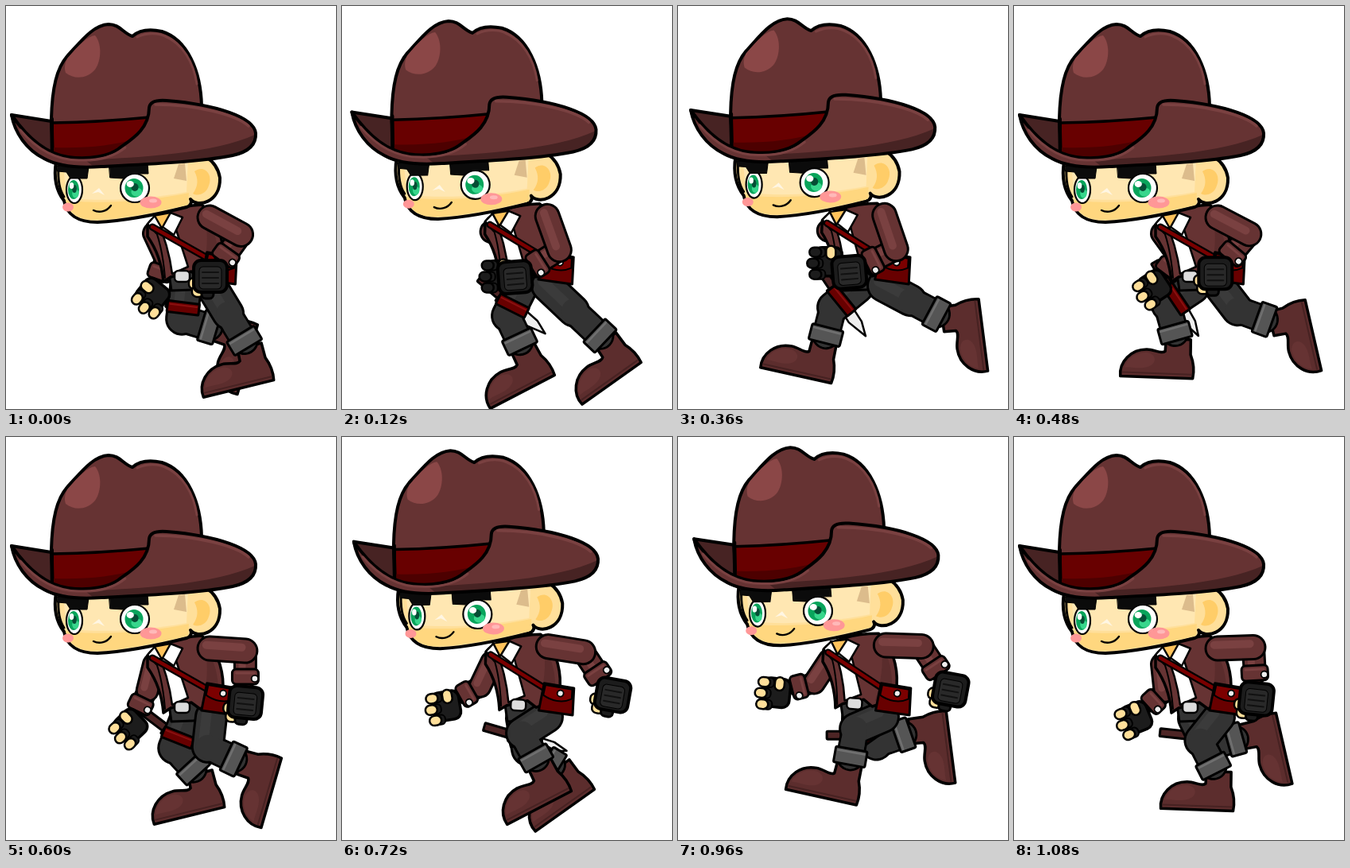
Write an HTML page with a canvas that moves like this. It is 415 by 507 pixels and loops after 1.2 s.

```html
<!DOCTYPE html>
<html lang="en">
<head>
<meta charset="utf-8">
<title>Running adventurer</title>
<style>
html, body { margin: 0; width: 100%; height: 100%; overflow: hidden; background: #fff; }
canvas { display: block; }
</style>
</head>
<body>
<canvas id="stage" width="415" height="507"></canvas>
<script>
const ctx = document.getElementById('stage').getContext('2d');
const STEP = 120, COUNT = 10, RAD = Math.PI / 180;
const BROWN = '#663333', LIGHT = '#7a4141', RED = '#680000', PANTS = '#333', GLOVE = '#1c1c1c', SKIN = '#ffdf9a';

// One run cycle as a mean plus first and second harmonics.
function wave(step, mean, c1, s1, c2 = 0, s2 = 0) {
  const a = step * 36 * RAD;
  return mean + c1 * Math.cos(a) + s1 * Math.sin(a) + c2 * Math.cos(2 * a) + s2 * Math.sin(2 * a);
}

const bootAngle = s => wave(s, -41, 30, -48, -4, 10);
const nearFoot = s => ({ x: wave(s, 288, 4, 66, 15), y: wave(s, 414, 11, -8, 8, 4), angle: bootAngle(s) });
const farFoot = s => ({ x: wave(s, 248, 12, -56, 9, 2), y: wave(s, 412, -10, 27, 6, 14), angle: bootAngle(s + 5) });
const nearReach = s => ({ x: wave(s, 279, -22, -74), y: wave(s, 332, 3, 10, 6) });
const farReach = s => ({ x: wave(s, 162, 14, 39, 8), y: wave(s, 338, 0, 0, 26, -8) });

// The head rises once per stride, higher on the second one.
function headShift(s) {
  const rise = (s < 5 ? 11 : 16) * Math.sin(Math.PI * (s % 5 / 4) ** 1.3);
  return [rise, -rise * .75];
}

// Two-bone limb; a reach beyond full length stretches both bones.
function joint(from, to, upper, lower, side) {
  const dx = to.x - from.x, dy = to.y - from.y, d = Math.hypot(dx, dy);
  const k = Math.max(1, d / (upper + lower));
  const u = upper * k, l = lower * k;
  const along = (d * d + u * u - l * l) / (2 * d);
  const out = side * Math.sqrt(Math.max(0, u * u - along * along));
  return { x: from.x + (dx * along + dy * out) / d, y: from.y + (dy * along - dx * out) / d };
}

const direction = (a, b) => Math.atan2(b.y - a.y, b.x - a.x);
const mix = (a, b, t) => ({ x: a.x + (b.x - a.x) * t, y: a.y + (b.y - a.y) * t });
const before = (p, angle, gap) => ({ x: p.x - gap * Math.cos(angle), y: p.y - gap * Math.sin(angle) });

function shape(d, fill, width = 0, color = '#000') {
  const p = new Path2D(d);
  if (fill) { ctx.fillStyle = fill; ctx.fill(p); }
  if (width) { ctx.lineWidth = width; ctx.strokeStyle = color; ctx.stroke(p); }
}

function paint(fill, width) {
  ctx.fillStyle = fill;
  ctx.fill();
  if (width) { ctx.lineWidth = width; ctx.strokeStyle = '#000'; ctx.stroke(); }
}

function oval(x, y, rx, ry, fill, width = 0) {
  ctx.beginPath();
  ctx.ellipse(x, y, rx, ry, 0, 0, 7);
  paint(fill, width);
}

function box(x, y, w, h, r, fill, width = 3) {
  ctx.beginPath();
  ctx.roundRect(x, y, w, h, r);
  paint(fill, width);
}

function placed({ x, y }, angle, draw) {
  ctx.save();
  ctx.translate(x, y);
  ctx.rotate(angle);
  draw();
  ctx.restore();
}

function segment(a, b, w, fill, shine) {
  const d = `M${a.x} ${a.y}L${b.x} ${b.y}`;
  shape(d, null, w, '#000');
  shape(d, null, w - 6, fill);
  placed({ x: -w * .13, y: -w * .13 }, 0, () => shape(d, null, w * .3, shine));
}

function boot(foot) {
  placed(foot, foot.angle * RAD, () => {
    shape('M-15-5L16-5 16 14C20 24 21 34 19 44L-72 42C-74 24-59 8-39 8C-29 8-21 14-16 10Z', '#5c2d2d', 3.5);
    shape('M-67 31C-64 18-50 11-38 12C-26 15-26 26-38 30C-48 33-58 30-67 31Z', BROWN);
    shape('M-69 37L17 39', null, 2, '#472222');
  });
}

function leg(hip, foot, knee) {
  const angle = direction(knee, foot), cuff = before(foot, angle, 14);
  boot(foot);
  segment(knee, cuff, 36, PANTS, '#3b3b3b');
  segment(hip, knee, 42, PANTS, '#3b3b3b');
  shape(`M${knee.x} ${knee.y}L${cuff.x} ${cuff.y}`, null, 30, PANTS);
  placed(cuff, angle, () => {
    box(-10, -20, 20, 40, 2, '#555');
    shape('M-6-17L-6 17', null, 2.5, '#707070');
  });
}

function sleeve(shoulder, elbow, hand, w) {
  const angle = direction(elbow, hand), cuff = before(hand, angle, w);
  segment(elbow, cuff, w - 3, BROWN, LIGHT);
  segment(shoulder, elbow, w, BROWN, LIGHT);
  placed(cuff, angle, () => {
    box(-10, -w / 2, 19, w, 5, BROWN);
    shape(`M-5 ${5 - w / 2}L-5 ${w / 2 - 5}`, null, 3, LIGHT);
    oval(2, -w * .36, 4.2, 4.2, '#eee', 1.8);
  });
}

function nearHand(hand, fist) {
  placed(hand, (hand.x - 255) * .12 * RAD, () => {
    if (!fist) {
      box(-27, 1, 15, 14, 6, SKIN, 2.5);
      box(-23, 11, 15, 14, 6, SKIN, 2.5);
      box(-11, 14, 15, 13, 5, GLOVE);
    }
    box(-21, -21, 42, 40, 9, GLOVE, 4);
    box(-14, -13, 28, 28, 5, '#292929', 1);
    for (let y = -6; y < 12; y += 7) shape(`M-10 ${y}H10`, null, 2, '#111');
  });
}

function farHand(hand, angle, fist) {
  placed(hand, angle, () => {
    box(-16, -18, 34, 36, 9, GLOVE, 3.5);
    for (const i of [-1, 0, 1]) {
      const x = -19 + Math.abs(i) * 3, y = 2 + i * 14;
      box(x - 2, y - 6, 15, 12, 5, GLOVE, 2);
      box(x - 7, y - 6, 15, 12, 6, fist ? GLOVE : SKIN, 2.5);
    }
    box(-2, -20, 12, 17, 6, SKIN, 2.5);
  });
}

function knife(holster, thighAngle) {
  placed(holster, (thighAngle - 90 * RAD) * .65 + 23 * RAD, () => {
    shape('M-12-7L36-6 54 0 28 8-12 7Z', '#eee', 2.5);
    box(-54, -5, 36, 10, 1, '#4d2525');
    box(-21, -9, 6, 18, 1, '#444', 2.5);
  });
}

function strap(holster, thighAngle) {
  placed(holster, thighAngle, () => {
    box(-7, -20, 14, 40, 1, RED);
    shape('M-3-17L-3 17', null, 2, '#8b1010');
  });
}

function torso(dx, dy) {
  placed({ x: 230, y: 345 + dy * .4 }, dx * .3 * RAD, () => {
    ctx.translate(-230, -345);
    shape('M178 275C186 262 215 252 246 250C263 262 273 290 273 313L270 332 244 342 233 334 207 341 198 347C196 324 188 304 178 290Z', BROWN, 3.5);
    shape('M250 264C262 280 268 300 267 326L247 335C253 312 255 288 250 264Z', '#5a2c2c');
    shape('M189 267L208 263 229 328 209 337C206 313 199 289 189 267Z', '#fff', 2.5);
    shape('M184 272C194 293 198 318 200 342', null, 2);
    shape('M186 264L208 260 196 280Z', '#ffc35c', 2);
    shape('M187 264L178 274 189 286 195 278Z', '#fff', 2.5);
    shape('M207 260L222 266 211 288 197 278Z', '#fff', 2.5);
    shape('M184 278L253 317', null, 9, '#000');
    shape('M184 278L253 317', null, 4.5, '#7a0000');
    box(212, 333, 19, 14, 5, '#ddd', 2.5);
  });
}

function bag(x, y) {
  placed({ x, y }, 8 * RAD, () => {
    shape('M-18-18L20-17 23 17-20 17Z', RED, 3);
    shape('M-16-16L18-15 19-3C8 4-6 3-17-3Z', '#7c0000', 2);
    oval(4, -8, 4, 4, '#eee', 1.8);
  });
}

function eye(x, y, rx, ry, iris) {
  oval(x, y, rx, ry, '#fff', 2.2);
  oval(x - 1, y, iris, 12, '#08a45b');
  oval(x + iris * .2, y + 5, iris * .6, 5.5, '#37d68c');
  oval(x, y - 1, iris * .4, 5, '#064d35');
  oval(x - iris * .5, y - 5, iris * .4, 4, '#fff');
}

function face() {
  shape('M63 196C59 220 66 236 73 245C76 262 90 272 115 272C155 270 195 261 227 253C233 251 234 246 232 243C240 254 270 248 269 216C267 204 261 196 252 190L100 190Z', SKIN, 4);
  shape('M72 200L229 194 227 234C180 243 120 247 76 241Z', '#ffe7b2');
  shape('M75 244C110 250 180 246 230 235L229 250C190 259 140 269 112 269C90 269 79 260 75 244Z', '#ffd77f');
  shape('M237 208C249 199 261 212 255 226C252 236 242 240 235 236C242 227 242 217 237 208Z', '#ffcd68');
  shape('M217 199L225 198 227 220 211 217Z', '#dcbc8c');
  shape('M66 202C65 220 68 233 73 240', null, 3);
  eye(86, 231, 10, 17, 7);
  eye(162, 229, 18, 18, 11.5);
  shape('M64 201L104 202 102 217 81 217 76 209 65 208Z', '#0b0b0b', 1);
  shape('M130 203L178 198 179 211 157 211 147 217 131 216Z', '#0b0b0b', 1);
  oval(78, 253, 7, 5.5, '#ff9797');
  oval(182, 247, 13.5, 7.5, '#ff9797');
  oval(185, 245, 5, 2.5, '#ffb9b9');
  shape('M108 236L117 229 124 238 116 234Z', '#fff6e3');
  shape('M110 257C118 261 127 258 132 251', null, 2.4);
}

function hat() {
  shape('M7 137L57 145 60 192C36 186 14 164 7 137Z', '#472323', 4);
  shape('M58 192L57 142C58 102 64 78 77 63C94 45 109 24 129 23C143 23 147 34 159 38C168 30 182 29 196 32C228 42 245 82 246 126L180 190Z', BROWN, 4);
  shape('M77 66C92 48 103 38 112 37C122 49 119 72 111 81C102 91 86 93 75 84C73 78 74 72 77 66Z', '#8b4747');
  shape('M165 39C178 33 192 34 200 38C222 47 236 71 240 98', null, 3, LIGHT);
  shape('M58 147Q120 146 180 140L172 164 130 190 59 190Z', RED, 3.5);
  shape('M60 178Q120 180 164 167L130 190 60 190Z', '#4d0000');
  shape('M58 142L58 190', null, 4);
  const brim = 'M7 137C25 163 48 186 78 190C106 194 130 188 141 180C154 170 180 157 180 128C181 120 189 118 202 119C265 124 312 140 314 160C315 176 303 184 285 188C245 196 180 199 120 202C92 204 66 202 48 192C26 181 11 160 7 137Z';
  shape(brim, BROWN);
  shape('M100 194C170 190 260 186 313 162C314 176 303 184 285 188C245 196 180 199 110 202Z', '#472323');
  shape(brim, null, 4);
  shape('M188 124C240 124 290 137 305 151', null, 3.5, LIGHT);
  shape('M18 156C40 182 64 194 92 194C120 195 138 188 150 178', null, 3, LIGHT);
}

function head(dx, dy) {
  placed({ x: 150 + dx, y: 150 + dy }, dy * .05 * RAD, () => {
    ctx.translate(-150, -150);
    face();
    hat();
  });
}

function render() {
  const step = Math.floor(performance.now() % (STEP * COUNT) / STEP);
  const [dx, dy] = headShift(step);

  const farHip = { x: 226, y: 354 }, nearHip = { x: 258, y: 352 };
  const farAnkle = farFoot(step), nearAnkle = nearFoot(step);
  const farKnee = joint(farHip, farAnkle, 40, 50, -1);
  const nearKnee = joint(nearHip, nearAnkle, 38, 50, -1);
  const holster = mix(farHip, farKnee, .65), thighAngle = direction(farHip, farKnee);

  const farShoulder = { x: 186 + dx * .3, y: 286 + dy * .5 };
  const nearShoulder = { x: 256 + dx * .4, y: 266 + dy * .4 };
  const far = farReach(step), near = nearReach(step);
  const farElbow = joint(farShoulder, far, 34, 50, 1);
  const nearElbow = joint(nearShoulder, near, 45, 66, 1);
  const fist = near.x - far.x < 40;

  ctx.fillStyle = '#fff';
  ctx.fillRect(0, 0, 415, 507);
  ctx.lineCap = ctx.lineJoin = 'round';

  knife(holster, thighAngle);
  leg(farHip, farAnkle, farKnee);
  strap(holster, thighAngle);
  sleeve(farShoulder, farElbow, far, 30);
  shape('M204 330L246 326 262 356 208 358Z', PANTS, 3);
  leg(nearHip, nearAnkle, nearKnee);
  torso(dx, dy);
  bag(268 + dx * .2, 330);
  farHand(far, fist ? 0 : direction(farElbow, far) - 160 * RAD, fist);
  sleeve(nearShoulder, nearElbow, near, 33);
  nearHand(near, fist);
  head(dx, dy);
  requestAnimationFrame(render);
}
render();
</script>
</body>
</html>
```
